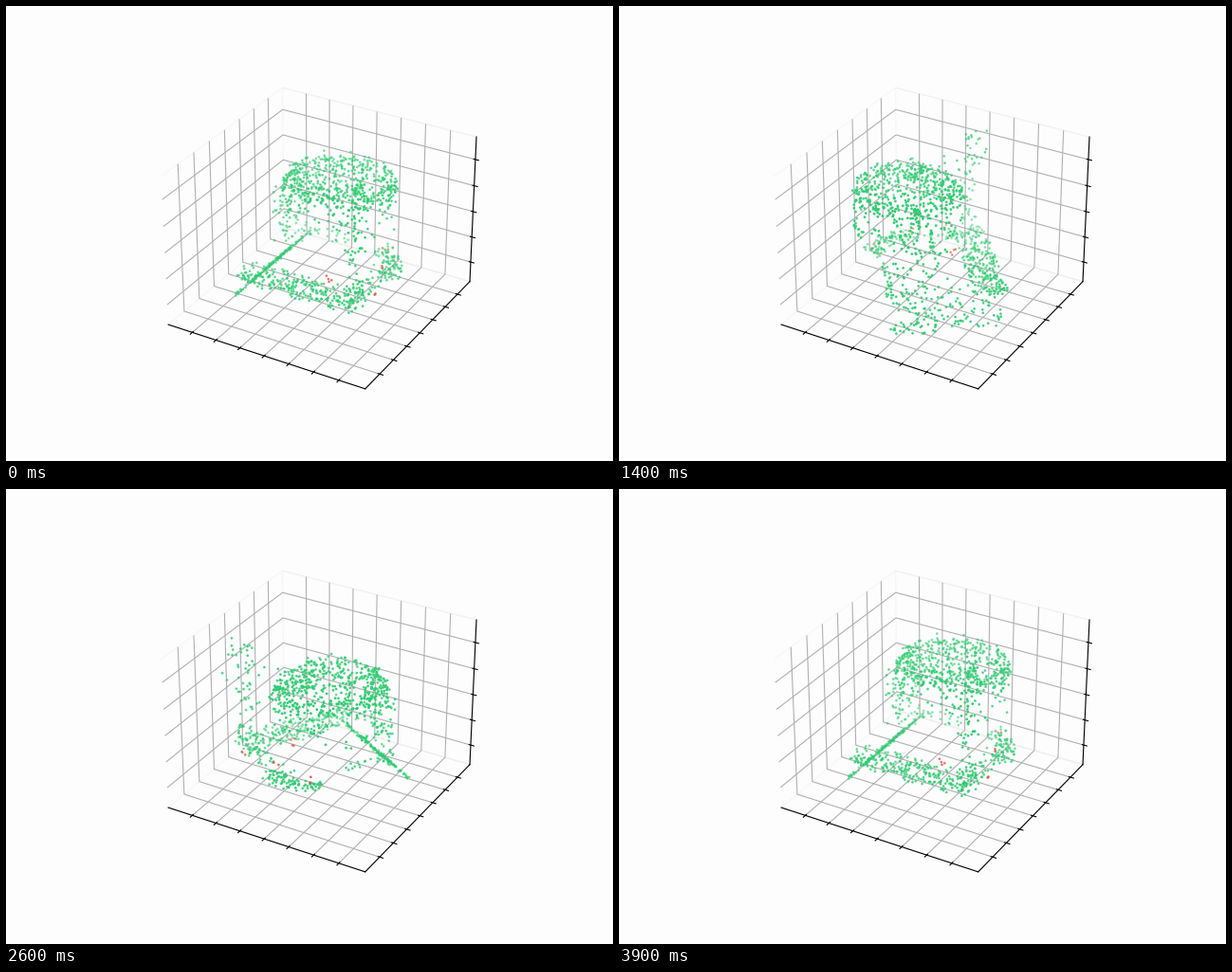
A matplotlib script that plays this animation: 640 by 480 pixels, repeating every 4000 ms.

```python
import numpy as np
import matplotlib.pyplot as plt
from matplotlib.animation import FuncAnimation

FRAMES = 40
PAPER, GREEN, RED = "#fdfdfd", "#2ecc71", "#e74c3c"
rng = np.random.default_rng(4)


def uni(lo, hi, n):
    return rng.uniform(lo, hi, n)


def box(n, xs, ys, zs):
    return np.column_stack([uni(*xs, n), uni(*ys, n), uni(*zs, n)])


def blob(n, center, spread):
    return rng.normal(center, spread, (n, 3))


def disc(n, center, radius):
    """Thin round top, denser towards its rim."""
    a = uni(0, 2 * np.pi, n)
    r = radius * uni(0, 1, n) ** 0.42
    z = center[2] + rng.normal(0, 0.13, n)
    return np.column_stack([center[0] + r * np.cos(a),
                            center[1] + 0.95 * r * np.sin(a), z])


def apron(n, center, radius):
    """Points hanging below the rim, thinning out downwards."""
    a = uni(0, 2 * np.pi, n)
    r = radius + rng.normal(0, 0.12, n)
    z = center[2] - 1.4 * uni(0, 1, n) ** 1.5
    return np.column_stack([center[0] + r * np.cos(a),
                            center[1] + 0.95 * r * np.sin(a), z])


def skirt(n):
    """Slanted panel along the left side."""
    x = uni(-2.65, -1.6, n)
    z = -2.4 + 1.08 * (x + 2.65) + rng.normal(0, 0.04, n)
    return np.column_stack([x, uni(-2.0, 2.0, n), z])


def corner(n):
    """Curved patch at the right rear."""
    a = np.radians(uni(12, 60, n))
    r = 2.5 + rng.normal(0, 0.22, n)
    return np.column_stack([r * np.cos(a), r * np.sin(a),
                            rng.normal(-1.33, 0.09, n)])


def post(n):
    """Sparse upright at the right front, wider at the top."""
    z = uni(-1.1, 2.5, n)
    spread = 0.18 + 0.06 * (z + 1.1)
    return np.column_stack([2.25 + rng.normal(0, 1, n) * spread,
                            -1.6 + rng.normal(0, 1, n) * spread, z])


TOP = (0.2, 0.95, 1.57)
green = np.vstack([
    disc(440, TOP, 2.05),
    apron(150, TOP, 1.95),
    box(85, (-1.98, -1.72), (-0.3, 1.9), (-1.3, 1.4)),
    skirt(150),
    box(250, (-2.3, 2.5), (-2.25, -1.05), (-1.48, -1.15)),
    post(65),
    corner(75),
    box(45, (1.8, 2.5), (-1.2, 1.0), (-1.45, -1.2)),
    box(18, (-1.7, 0.2), (1.7, 2.0), (-1.35, -1.0)),
])
red = np.vstack([
    blob(4, (0.74, -0.74, -1.24), 0.1),
    blob(2, (2.66, -0.88, -1.19), 0.05),
    blob(2, (2.18, 0.54, -1.06), 0.05),
    blob(2, (1.56, 1.96, -1.1), 0.05),
])
cloud = np.vstack([green, red])
colors = [GREEN] * len(green) + [RED] * len(red)

fig = plt.figure(figsize=(6.4, 4.8), dpi=100, facecolor=PAPER)
ax = fig.add_subplot(projection="3d", facecolor=PAPER)
ax.view_init(elev=30, azim=-60)
ax.set(xlim=(-4.03, 4.03), ylim=(-4.03, 4.03), zlim=(-2.79, 2.85))
for axis, reach in ((ax.xaxis, 3), (ax.yaxis, 3), (ax.zaxis, 2)):
    axis.set_ticks(range(-reach, reach + 1), labels=[])
    axis.pane.fill = False

dots = None


def draw(i):
    global dots
    if dots is not None:
        dots.remove()
    # First and last steps share the same pose.
    t = 2 * np.pi * i / (FRAMES - 1)
    x, y, z = cloud.T
    dots = ax.scatter(x * np.cos(t) - y * np.sin(t),
                      x * np.sin(t) + y * np.cos(t),
                      z, s=1, c=colors)
    return [dots]


anim = FuncAnimation(fig, draw, frames=FRAMES, interval=100,
                     init_func=lambda: [], repeat=True, blit=False)
plt.show()
```
